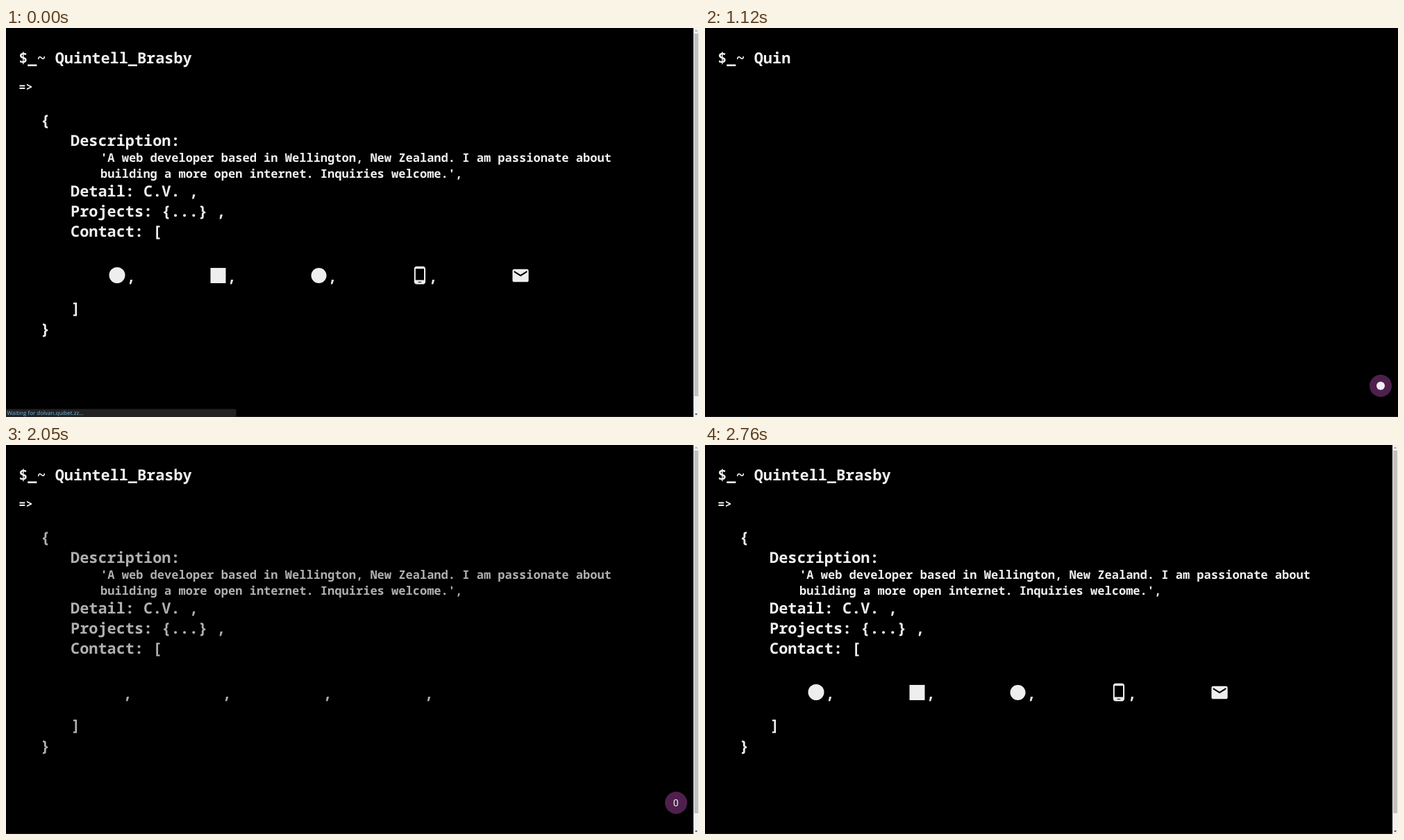
An HTML page for the animation above (5.02 s loop, 998 px wide and 561 px high).

```html
<!DOCTYPE html>
<html lang="en">
<head>
<meta charset="utf-8">
<title>Terminal portfolio</title>
<style>
  html, body { margin: 0; width: 100%; height: 100%; overflow: hidden; background: #000; }
  svg { display: block; width: 100vw; height: 100vh; --ch: 13.14px; }
  text {
    font: 600 21.9px "Roboto Mono", "Noto Sans Mono", "DejaVu Sans Mono", monospace;
    fill: #f1f1f1;
    white-space: pre;
    text-rendering: geometricPrecision;
  }
  .small { font-size: 17.04px; }
  .icons { fill: #eee; }

  /* One loop is 5020 ms, so 1% is about 50 ms. */
  .cover, .page, .details, .early, .late, .status, .badge, .dot, .count {
    animation: 5020ms step-end infinite;
  }
  .cover { animation-name: type; }
  .page { animation-name: page; }
  .details { animation-name: details; }
  .early { animation-name: early; }
  .late { animation-name: late; }
  .status { animation-name: status; }
  .badge { animation-name: badge; }
  .dot { animation-name: dot; }
  .count { animation-name: count; }

  /* The cover slides off the heading one character at a time. */
  @keyframes type {
    0% { transform: translateX(calc(19 * var(--ch))); }
    8.9% { transform: translateX(0px); }
    11.1% { transform: translateX(var(--ch)); }
    15.7% { transform: translateX(calc(2 * var(--ch))); animation-timing-function: steps(6); }
    22.2% { transform: translateX(calc(8 * var(--ch))); }
    26.8% { transform: translateX(calc(9 * var(--ch))); animation-timing-function: steps(9); }
    37.6% { transform: translateX(calc(18 * var(--ch))); }
    39.8%, 100% { transform: translateX(calc(19 * var(--ch))); }
  }
  @keyframes page {
    0% { opacity: 1; }
    8.9% { opacity: 0; }
    39.8%, 100% { opacity: 1; }
  }
  @keyframes details {
    0% { opacity: 1; }
    8.9% { opacity: 0; }
    39.8% { opacity: .4; }
    40.8% { opacity: .73; }
    42% { opacity: .93; }
    43.4%, 100% { opacity: 1; }
  }
  @keyframes early {
    0% { opacity: 0; }
    39.8% { opacity: 1; }
    44.6%, 100% { opacity: 0; }
  }
  @keyframes late {
    0% { opacity: 1; }
    8.9% { opacity: 0; }
    44.6%, 100% { opacity: 1; }
  }
  @keyframes status {
    0% { opacity: 1; }
    14.5% { opacity: 1; animation-timing-function: steps(4, start); }
    18%, 100% { opacity: 0; }
  }
  @keyframes badge {
    0% { opacity: 0; transform: none; }
    8.9% { opacity: 1; transform: none; }
    39.8% { opacity: 1; transform: translateX(-8px); }
    54.9%, 100% { opacity: 0; transform: translateX(-8px); }
  }
  @keyframes dot {
    0% { opacity: 1; }
    32%, 100% { opacity: 0; }
  }
  @keyframes count {
    0% { opacity: 0; }
    32%, 100% { opacity: 1; }
  }
</style>
</head>
<body>
<svg viewBox="0 0 998 561" preserveAspectRatio="none">
  <rect width="998" height="561"/>
  <rect y="560" width="998" height="1" fill="#1a1a1a"/>

  <text x="18.2" y="50.5">$_~ Quintell_Brasby</text>
  <rect class="cover" x="18.2" y="22" width="300" height="42"/>

  <g class="page">
    <text class="small" x="18.2" y="91">=&gt;</text>
    <rect x="990" width="8" height="561" fill="#f1f1f1"/>
    <rect x="991" y="8" width="6" height="523" fill="#c1c1c1"/>
    <path d="M992 5l2-2.5 2 2.5z" fill="#a3a3a3"/>
    <path d="M992 556l2 2.5 2-2.5z" fill="#505050"/>
  </g>

  <g class="details">
    <text x="50" y="141.3">{</text>
    <text x="93" y="170">Description:</text>
    <text class="small" x="136.1" y="193">'A web developer based in Wellington, New Zealand. I am passionate about</text>
    <text class="small" x="136.1" y="215.5">building a more open internet. Inquiries welcome.',</text>
    <text x="93" y="243.3">Detail: C.V. ,</text>
    <text x="93" y="272">Projects: {...} ,</text>
    <text x="93" y="300.5">Contact: [</text>
    <text class="early" x="168.5 311.5 456.5 602.5" y="365.5">,,,,</text>
    <text x="94" y="412">]</text>
    <text x="50" y="441.5">}</text>
  </g>

  <g class="late">
    <text x="173.5 318.5 463.5 608.5" y="365.5">,,,,</text>
    <g class="icons">
      <circle cx="160" cy="356.5" r="11.5"/>
      <rect x="294.5" y="346" width="22" height="22"/>
      <circle cx="450.5" cy="357" r="11"/>
      <path transform="translate(582 342.7) scale(1.16)" d="M16 1H8C6.34 1 5 2.34 5 4v16c0 1.66 1.34 3 3 3h8c1.66 0 3-1.34 3-3V4c0-1.66-1.34-3-3-3zm-2 20h-4v-1h4v1zm3.25-3H6.75V4h10.5v14z"/>
      <path transform="translate(727.1 343.1) scale(1.16)" d="M20 4H4c-1.1 0-2 .9-2 2v12c0 1.1.9 2 2 2h16c1.1 0 2-.9 2-2V6c0-1.1-.9-2-2-2zm0 4l-8 5-8-5V6l8 5 8-5v2z"/>
    </g>
  </g>

  <g class="status">
    <path d="M0 549.5h329.5q2 0 2 2V561H0z" fill="#222"/>
    <text x="1.5" y="558" style="font: 400 8px 'Open Sans', 'Noto Sans', sans-serif; fill: #6fb9e4">Waiting for dolvan.quibet.zz...</text>
  </g>

  <g class="badge">
    <circle cx="973" cy="516" r="16" fill="#4f204d"/>
    <circle class="dot" cx="973" cy="516" r="6" fill="#f4eef4"/>
    <text class="count" x="972.8" y="521" text-anchor="middle" style="font: 400 14px Roboto, 'Open Sans', sans-serif">0</text>
  </g>
</svg>
</body>
</html>
```
